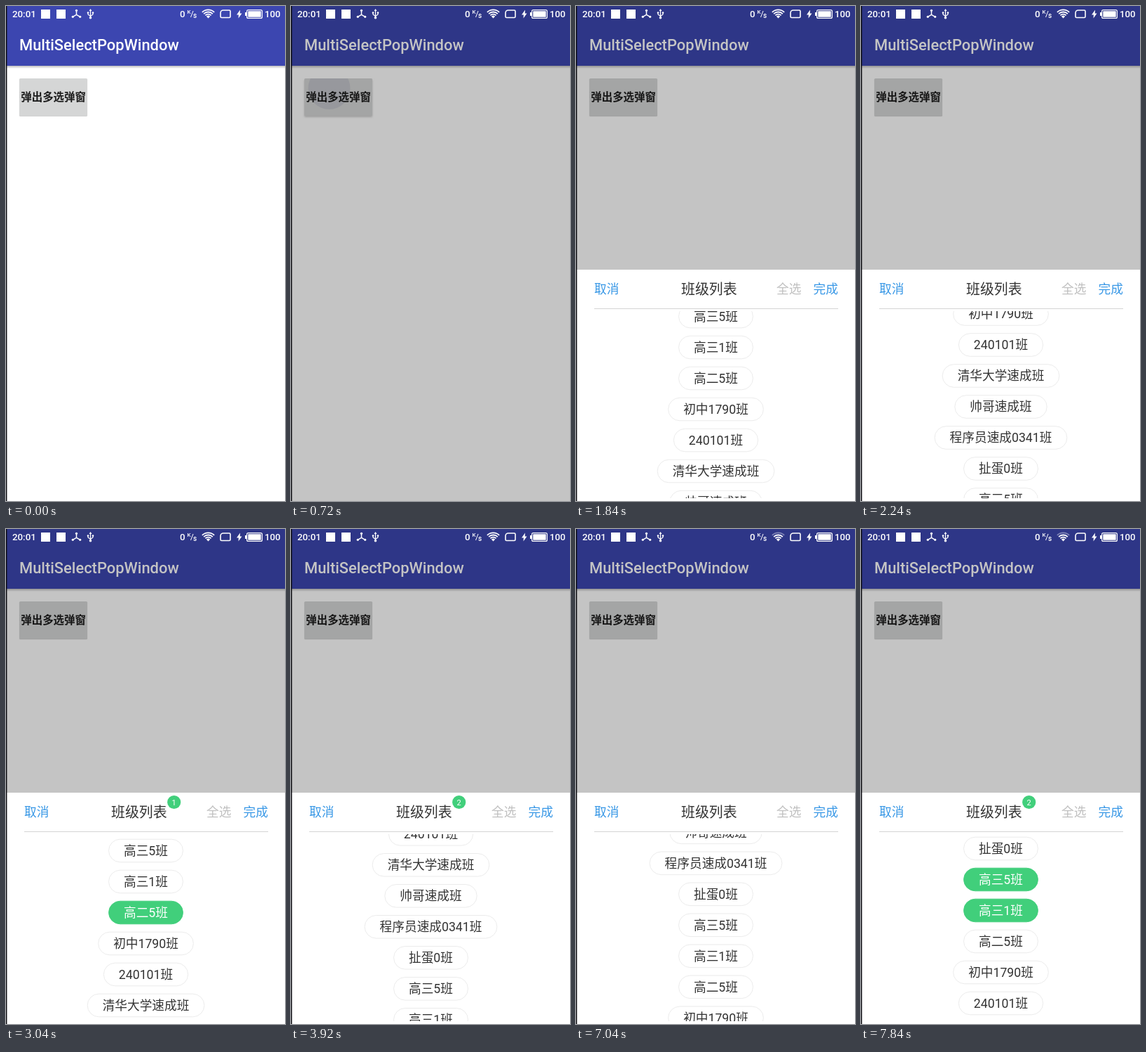
Write an HTML page with a canvas that moves like this. It is 398 by 704 pixels and loops after 8000 ms.

```html
<!DOCTYPE html>
<html lang="zh-CN">
<head>
<meta charset="utf-8">
<title>MultiSelectPopWindow</title>
<style>
  html, body { margin: 0; width: 100%; height: 100%; overflow: hidden; background: #fff; }
  canvas { display: block; }
</style>
</head>
<body>
<canvas id="stage" width="398" height="704"></canvas>
<script>
const ctx = document.getElementById('stage').getContext('2d');
const W = 398, H = 704, LOOP = 8000, STEP = 80;
const FONT = 'Roboto, "Noto Sans CJK SC", "Noto Sans CJK", sans-serif';
const GREEN = '#41cf7b', BLUE = '#3998e6', INK = '#333', WHITE = '#fff';
const PRESS = 560, SLIDE = 720, PANEL_TOP = 375, ROW = 44, CENTER = 199.5;

const classes = ['高三5班', '高三1班', '高二5班', '初中1790班', '240101班',
  '清华大学速成班', '帅哥速成班', '程序员速成0341班', '扯蛋0班'];
const items = [...classes, ...classes];

const taps = [
  { at: 3040, row: 2 }, { at: 3360, row: 3 }, { at: 5120, row: 7 },
  { at: 7600, row: 9 }, { at: 7840, row: 10 }
];
const ALL_ON = 5360, ALL_OFF = 6320;

const progress = (t, start, length) => Math.min(1, Math.max(0, (t - start) / length));
const easeOut = (u, power) => 1 - (1 - u) ** power;
const glide = (t, start, length, distance) => distance * easeOut(progress(t, start, length), 2.6);

// A drag down and back, then three flicks
function scrollAt(t) {
  const swing = Math.sin(Math.PI * progress(t, 1760, 800)) ** 2;
  return 167.5 * swing + glide(t, 3680, 400, 220) + glide(t, 4240, 160, -2)
    + glide(t, 6960, 320, 137);
}

function selection(t) {
  if (t >= ALL_ON && t < ALL_OFF) return new Set(items.keys());
  const since = t >= ALL_OFF ? ALL_OFF : 0;
  return new Set(taps.filter(({ at }) => at >= since && at <= t).map(({ row }) => row));
}

function text(str, x, y, size, color, weight = 400, align = 'left') {
  ctx.font = `${weight} ${size}px ${FONT}`;
  ctx.fillStyle = color;
  ctx.textAlign = align;
  ctx.fillText(str, x, y);
}

function rect(x, y, w, h, color, r = 0) {
  ctx.fillStyle = color;
  ctx.beginPath();
  ctx.roundRect(x, y, w, h, r);
  ctx.fill();
}

function outline(x, y, w, h, r, width, color = WHITE) {
  ctx.strokeStyle = color;
  ctx.lineWidth = width;
  ctx.beginPath();
  ctx.roundRect(x, y, w, h, r);
  ctx.stroke();
}

function circle(x, y, r, color = WHITE) {
  ctx.fillStyle = color;
  ctx.beginPath();
  ctx.arc(x, y, r, 0, Math.PI * 2);
  ctx.fill();
}

function line(x0, y0, x1, y1, width) {
  ctx.strokeStyle = WHITE;
  ctx.lineWidth = width;
  ctx.beginPath();
  ctx.moveTo(x0, y0);
  ctx.lineTo(x1, y1);
  ctx.stroke();
}

function triangle(x, y, dx1, dy1, dx2, dy2) {
  ctx.fillStyle = WHITE;
  ctx.beginPath();
  ctx.moveTo(x, y);
  ctx.lineTo(x + dx1, y + dy1);
  ctx.lineTo(x + dx2, y + dy2);
  ctx.fill();
}

function clipped(x, y, w, h, paint) {
  ctx.save();
  ctx.beginPath();
  ctx.rect(x, y, w, h);
  ctx.clip();
  paint();
  ctx.restore();
}

function spokes(x, y) {
  for (let i = 0; i < 3; i++) {
    const a = Math.PI * (2 * i / 3 - 0.5);
    const tx = x + 6 * Math.cos(a), ty = y + 6 * Math.sin(a);
    line(x, y, tx, ty, 1.5);
    circle(tx, ty, 1.6);
  }
}

function usb(x, y) {
  line(x, y - 5, x, y + 5, 1.3);
  triangle(x, y - 7.5, -2, 3, 2, 3);
  circle(x, y + 5.3, 1.8);
  for (const side of [-1, 1]) {
    line(x, y + 3, x + side * 3.5, y + 0.5, 1.2);
    line(x + side * 3.5, y + 0.8, x + side * 3.5, y - 2, 1.2);
    circle(x + side * 3.5, y - 2, 1.3);
  }
}

function wifi(x, y, weak) {
  const from = -Math.PI * 0.75, to = -Math.PI * 0.25;
  ctx.fillStyle = WHITE;
  ctx.beginPath();
  ctx.moveTo(x, y);
  ctx.arc(x, y, 3.8, from, to);
  ctx.fill();
  ctx.lineWidth = 1.8;
  for (let i = 1; i <= 3; i++) {
    ctx.strokeStyle = weak && i === 3 ? 'rgba(255,255,255,.4)' : WHITE;
    ctx.beginPath();
    ctx.arc(x, y, 2.6 + 3.2 * i, from, to);
    ctx.stroke();
  }
}

function statusBar(t) {
  text('20:01', 9, 16, 13.3, WHITE, 500);
  rect(50, 5, 13, 13, WHITE);
  rect(72, 5, 13, 13, WHITE);
  spokes(100.5, 12.3);
  usb(120.5, 11.5);

  text('0', 248, 16, 13.3, WHITE, 500);
  text('K', 258.5, 11, 8, WHITE, 500);
  line(263.5, 16, 267, 7, 1);
  text('s', 267, 17, 10, WHITE, 500);
  wifi(288.5, 17.5, t >= 5120);
  outline(306, 6, 14, 10.5, [4, 1.5, 1.5, 1.5], 1.6);
  triangle(334, 5.5, -5, 7, -0.5, 7);
  triangle(331.5, 17.5, 5, -7, 0.5, -7);
  outline(343.6, 5.6, 21.8, 11.8, 2, 1.2);
  rect(345.3, 7.3, 18.4, 8.4, WHITE, 0.5);
  rect(341, 9, 2.2, 5, WHITE);
  text('100', 369, 16, 13.2, WHITE, 500);
}

function button(t) {
  const x = 19, y = 103, w = 97, h = 53;
  const pressed = t >= PRESS && t < 1040;
  ctx.save();
  ctx.shadowColor = 'rgba(0,0,0,.2)';
  ctx.shadowBlur = pressed ? 3 : 1;
  ctx.shadowOffsetY = pressed ? 2 : 1;
  rect(x, y, w, h, '#d5d6d6', 1.5);
  ctx.restore();
  if (t >= PRESS) {
    const fade = 0.13 * (1 - progress(t, 800, 320));
    clipped(x, y, w, h, () =>
      circle(54.5, 117, 14 + (t - PRESS) * 0.1, `rgba(80,95,140,${fade})`));
  }
  text('弹出多选弹窗', 67.6, 135, 15.45, '#1c1c1c', 700, 'center');
}

function page(t) {
  rect(0, 0, W, H, WHITE);
  const shade = ctx.createLinearGradient(0, 85, 0, 89);
  shade.addColorStop(0, 'rgba(0,0,0,.26)');
  shade.addColorStop(1, 'rgba(0,0,0,0)');
  rect(0, 85, W, 4, shade);
  rect(0, 0, W, 85, '#3c46b0');
  text('MultiSelectPopWindow', 19, 63, 21.9, WHITE, 500);
  button(t);
  if (t >= PRESS) rect(0, 0, W, H, `rgba(0,0,0,${0.23 * progress(t, 480, 240)})`);
  statusBar(t);
}

function pill(label, y, on) {
  ctx.font = `400 17.68px ${FONT}`;
  const w = ctx.measureText(label).width + 43;
  const x = CENTER - w / 2;
  rect(x, y - 16.3, w, 32.6, on ? GREEN : WHITE, 16.3);
  outline(x, y - 16.3, w, 32.6, 16.3, 0.9, on ? GREEN : '#e9e9e9');
  text(label, CENTER, Math.round(y + 6.4), 17.68, on ? WHITE : INK, 400, 'center');
}

function panel(t) {
  const height = H - PANEL_TOP;
  const top = Math.round(H - height * easeOut(progress(t, SLIDE, 652), 3));
  const chosen = selection(t);
  const scroll = scrollAt(t);

  rect(0, top, W, height, WHITE);
  const base = top + 34;
  text('取消', 26, base, 17.68, BLUE);
  text('班级列表', 150, base + 1, 19.9, INK);
  text('全选', 286, base, 17.68, chosen.size === items.length ? GREEN : '#bfbfbf');
  text('完成', 338.5, base, 17.68, BLUE);
  rect(26, top + 55, 348, 1, '#d4d4d4');

  clipped(0, top + 59, W, 266, () => items.forEach((label, i) =>
    pill(label, top + 82.5 + i * ROW - scroll, chosen.has(i))));

  if (chosen.size) {
    circle(239.7, top + 13.5, 9.6, GREEN);
    text(chosen.size, 239.7, top + 17.5, 11, WHITE, 400, 'center');
  }
}

function draw(elapsed) {
  const t = Math.floor((elapsed % LOOP) / STEP) * STEP;
  page(t);
  if (t > SLIDE) panel(t);
  rect(0, 0, 1.4, H, '#0c0c10');
}

let start;
function tick(now) {
  start ??= now;
  draw(now - start);
  requestAnimationFrame(tick);
}
draw(0);
requestAnimationFrame(tick);
</script>
</body>
</html>
```
